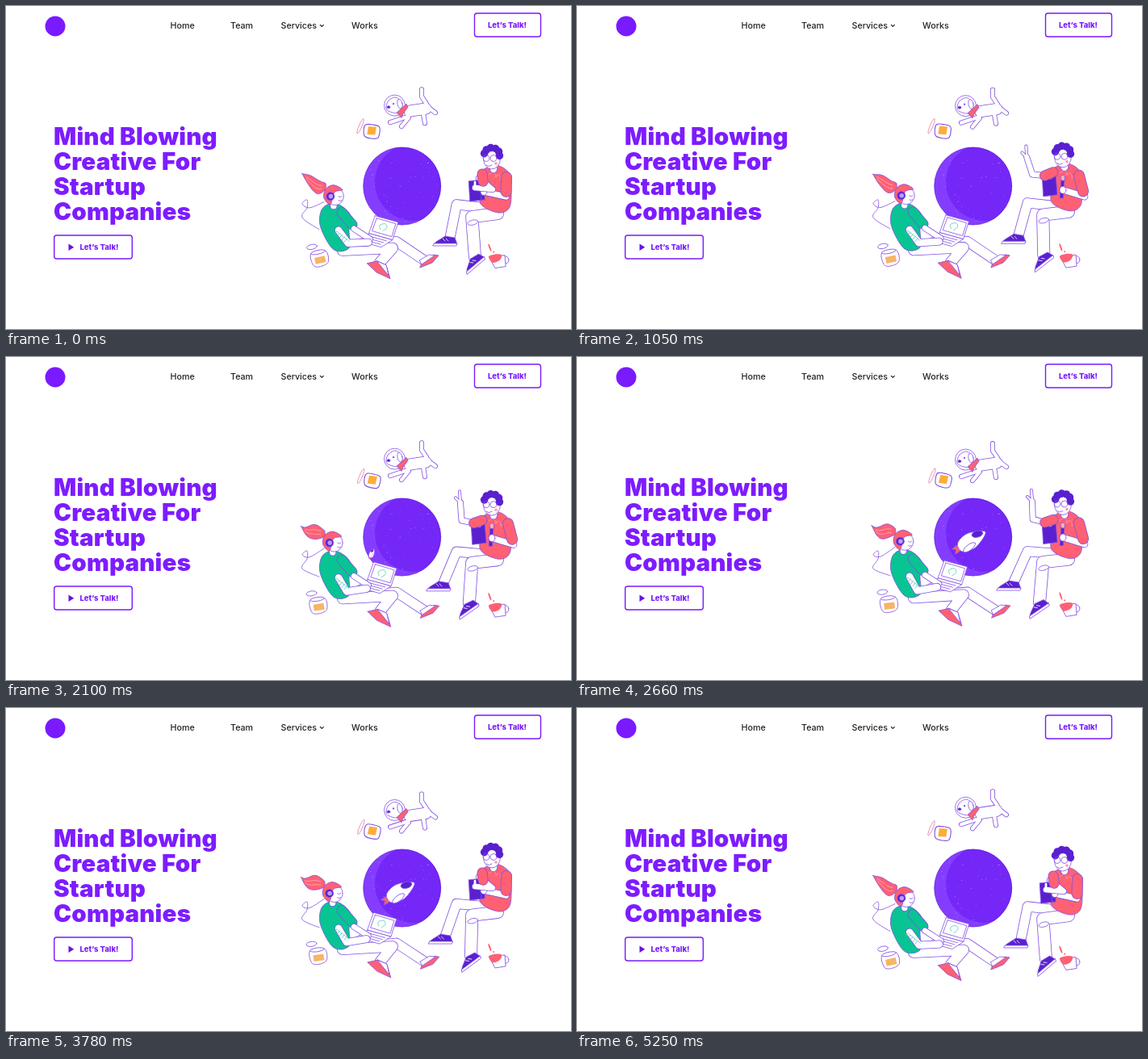
Write an HTML page with a canvas that moves like this. It is 700 by 400 pixels and loops after 5320 ms.

```html
<!DOCTYPE html>
<html lang="en">
<head>
<meta charset="utf-8">
<title>Creative studio</title>
<style>
  html, body { margin: 0; width: 100%; height: 100%; overflow: hidden; background: #fff; }
  svg, canvas { position: absolute; left: 0; top: 0; width: 700px; height: 400px; }
  text { font-family: Inter, "Open Sans", sans-serif; }
  .nav { font-size: 10.7px; font-weight: 500; fill: #222; }
  .btn { font-size: 9.5px; font-weight: 800; fill: #7a1aff; }
  .head { font-size: 29.5px; font-weight: 900; letter-spacing: .2px; fill: #7d1cff; }
</style>
</head>
<body>
<canvas></canvas>
<svg viewBox="0 0 700 400">
  <circle cx="61" cy="25" r="12.5" fill="#7a1aff"/>
  <g class="nav">
    <text x="203.5" y="27.5">Home</text>
    <text x="278" y="27.5">Team</text>
    <text x="340.5" y="27.5">Services</text>
    <text x="428" y="27.5">Works</text>
    <path d="M389 23.2l2.3 2.3 2.3-2.3" fill="none" stroke="#222" stroke-width="1.2"/>
  </g>
  <g fill="none" stroke="#7a1aff" stroke-width="1.4">
    <rect x="580.5" y="9" width="82" height="29" rx="3"/>
    <rect x="59.7" y="284" width="96.6" height="29" rx="3"/>
  </g>
  <path d="M77.5 294.5v8.4l6.7-4.2z" fill="#6a12e0"/>
  <g class="btn">
    <text x="597" y="26.8">Let’s Talk!</text>
    <text x="91.5" y="301.7">Let’s Talk!</text>
  </g>
  <g class="head">
    <text x="59" y="172">Mind Blowing</text>
    <text x="59" y="203">Creative For</text>
    <text x="59" y="234">Startup</text>
    <text x="59" y="265">Companies</text>
  </g>
</svg>
<script>
const LOOP = 5320, STEP = 70;
const LINE = '#8350e2', DARK = '#5a20d0', RED = '#ff6074', GREEN = '#08c493',
  TEAL = '#4fcdb5', GOLD = '#ffac38', WHITE = '#fff';

const canvas = document.querySelector('canvas');
const ctx = canvas.getContext('2d');
const dpr = devicePixelRatio || 1;
canvas.width = 700 * dpr;
canvas.height = 400 * dpr;
ctx.scale(dpr, dpr);
ctx.lineJoin = ctx.lineCap = 'round';

// --- motion ---
const lerp = (a, b, k) => a + (b - a) * k;
const wave = (t, phase) => (1 - Math.cos((t - phase) / LOOP * 2 * Math.PI)) / 2;
function ramp(t, from, to) {
  const k = Math.min(1, Math.max(0, (t - from) / (to - from)));
  return k * k * (3 - 2 * k);
}

// --- drawing helpers ---
function paint(fill, line = LINE, width = .8) {
  if (fill) { ctx.fillStyle = fill; ctx.fill(); }
  if (line) { ctx.strokeStyle = line; ctx.lineWidth = width; ctx.stroke(); }
}
function group(x, y, turn, body) {
  ctx.save();
  ctx.translate(x, y);
  ctx.rotate(turn);
  body();
  ctx.restore();
}
function oval(x, y, rx, ry, fill, line, turn = 0) {
  ctx.beginPath();
  ctx.ellipse(x, y, rx, ry, turn, 0, 2 * Math.PI);
  paint(fill, line);
}
function trace(pts) {
  ctx.beginPath();
  for (const p of pts) ctx.lineTo(...p);
}
function poly(pts, fill, line, width) {
  trace(pts);
  ctx.closePath();
  paint(fill, line, width);
}
function open(pts, line, width) {
  trace(pts);
  paint(null, line, width);
}
// Parallelogram from a corner and two sides.
function quad([x, y], [ux, uy], [vx, vy], fill, line) {
  poly([[x, y], [x + ux, y + uy], [x + ux + vx, y + uy + vy], [x + vx, y + vy]], fill, line);
}
// Smooth line through all points; closed when it has a fill.
function curve(pts, fill, line, width) {
  const n = pts.length, last = fill ? n : n - 1;
  const at = i => fill ? pts[(i + n) % n] : pts[Math.min(n - 1, Math.max(0, i))];
  ctx.beginPath();
  ctx.moveTo(...at(0));
  for (let i = 0; i < last; i++) {
    const [a, b, c, d] = [at(i - 1), at(i), at(i + 1), at(i + 2)];
    ctx.bezierCurveTo(b[0] + (c[0] - a[0]) / 6, b[1] + (c[1] - a[1]) / 6,
      c[0] - (d[0] - b[0]) / 6, c[1] - (d[1] - b[1]) / 6, ...c);
  }
  paint(fill, line, width);
}
// Outlined tubes that melt together; each part is [width, ...points].
function limbs(fill, ...parts) {
  for (const [inset, color] of [[0, LINE], [1.6, fill]]) {
    for (const [w, ...pts] of parts) open(pts, color, w - inset);
  }
}
// Middle joint of a two-bone limb.
function joint([ax, ay], [bx, by], upper, lower, side) {
  const d = Math.min(Math.hypot(bx - ax, by - ay), upper + lower);
  const dx = (bx - ax) / d, dy = (by - ay) / d;
  const along = (upper * upper - lower * lower + d * d) / (2 * d);
  const out = side * Math.sqrt(Math.max(0, upper * upper - along * along));
  return [ax + dx * along + dy * out, ay + dy * along - dx * out];
}
const bent = (w, a, b, upper, lower, side) => [w, a, joint(a, b, upper, lower, side), b];

let seed = 7;
const rand = () => (seed = seed * 16807 % 2147483647) / 2147483647;
const stars = Array.from({ length: 60 }, () => {
  const angle = rand() * 2 * Math.PI, far = 46 * Math.sqrt(rand());
  return [490.7 + far * Math.cos(angle), 223 + far * Math.sin(angle), .25 + rand() * .35];
});

// --- scene parts ---
function planet() {
  ctx.save();
  ctx.beginPath();
  ctx.arc(490.7, 223, 48, 0, 2 * Math.PI);
  ctx.clip();
  oval(490.7, 223, 48, 48, '#843dff', null);
  oval(505, 218, 48, 48, '#7427f7', null);
  for (const [x, y, r] of stars) oval(x, y, r, r, '#b084ff', null);
  ctx.restore();
  oval(490.7, 223, 48, 48, null, '#6420dc');
}

function rocket(t) {
  const p = ramp(t, 1820, 2600), q = ramp(t, 4450, 4980), size = p * (1 - q);
  if (size < .02) return;
  const x = 450 + 39 * p * p + 33 * q, y = 258 - 31 * p ** .6 - 33 * q;
  group(x, y, -1.4 + .85 * p - .15 * q, () => {
    ctx.scale(size, size);
    poly([[-17, -4], [-27, -4], [-23, 0], [-27, 4], [-17, 4]], RED);
    curve([[-17, -6], [0, -10], [20, 0], [0, 10], [-17, 6]], WHITE);
    oval(10, -3, 7, 4, DARK, LINE, .3);
    oval(-7, 6, 9, 3.5, WHITE, LINE, -.1);
  });
}

function dog(a) {
  group(0, 4.3 * a, 0, () => {
    limbs(WHITE,
      [15, [500, 130], [520, 127]],
      [6, [521, 121], [515, 112], [515, 103]],
      [6, [524, 126], [532, 132]], [6, [517, 133], [519, 145]],
      [6, [497, 137], [476, 144]], [6, [499, 138], [490, 149]]);
    oval(481.5, 123, 13, 13, WHITE);
    curve([[474, 117], [483, 113], [491, 121], [486, 132], [474, 130], [471, 125]], WHITE);
    oval(488, 121, 3, 6, WHITE, LINE, -.2);
    oval(474, 125, 2, 1.5, DARK);
    oval(480, 121, .7, .9, DARK);
    poly([[484, 132], [496, 121], [498, 125], [492, 133], [490, 138]], RED);
  });
}

function floaters(a) {
  group(453 + a, 155 - 3 * a, .15 + .1 * a, () => {
    curve([[-8, -7], [0, -8], [8, -7], [10, -1], [8, 8], [-7, 8], [-10, -2]], WHITE, LINE, 1.1);
    quad([-5, -5], [10, -1], [0, 10], GOLD, null);
  });
  group(439 + a, 149 - 2 * a, .4, () => oval(0, 0, 1.8, 10, WHITE, '#e08cae'));
  // jar
  group(388 - 2 * a, 311 - 7 * a, .1 * a - .22, () => {
    oval(-6, -14, 6.5, 3, WHITE);
    curve([[-9, -6], [9, -6], [10, 8], [0, 12], [-9, 9]], WHITE);
    quad([-6, 0], [13, 0], [0, 8], '#f6b567', null);
    oval(0, -6, 9, 2.4, WHITE);
  });
  // mug
  group(610, 316 - 3.5 * a, -.15, () => {
    oval(9, 0, 4, 4.5, WHITE);
    poly([[-11, -7], [9, -6], [8, 8], [-5, 8]], WHITE);
    curve([[-11, -7], [-3, -9], [5, -7], [2, -1], [-7, 1]], RED, null);
    oval(-8, -18, 1, 5, RED, null, -.2);
    oval(-4, -12, 1, 1, RED, null);
  });
}

function ponytail(a) {
  const side = sign => Array.from({ length: 7 }, (_, i) => {
    const s = i / 6;
    const mid = 223 - 15 * s ** 3 + 8 * a * s + 2 * Math.sin(s * 6 + 3 * a);
    return [396 - 29 * s, mid + sign * 9 * Math.sin(Math.PI * (.12 + .88 * s))];
  });
  curve([...side(-1), ...side(1).reverse()], RED);
  for (const k of [-.3, .3]) curve(side(k).slice(1, 6), null, '#ffb3bd');
}

function woman(a) {
  const hip = [424, 301 - 5 * a], seat = [417, 303 - 5 * a];
  const farFoot = [518 + a, 315 - a], nearFoot = [463 + a, 318 - 5 * a];
  const lift = 6.5 * a;
  const hand = [449 - 3 * a, 293 - 8.5 * a];

  curve([[394, 243 - 8 * a], [376, 250 - 3 * a], [367, 245], [373, 240], [373, 250],
    [367, 262], [388, 277 - lift]]);
  limbs(WHITE, bent(13, hip, farFoot, 60, 42, 1));
  group(...farFoot, 0, () => {
    poly([[-3, 2], [12, -7], [18, -6], [10, 3], [-5, 9]], RED);
    poly([[-6, 0], [6, -7], [13, -6], [-3, 5]], WHITE);
  });
  limbs(WHITE, bent(14, seat, nearFoot, 62, 24, 1));
  group(...nearFoot, 0, () => {
    poly([[-16, 1], [-3, -2], [8, 3], [13, 20], [-4, 12]], RED);
    poly([[-4, -2], [8, 3], [11, 16]], WHITE);
  });

  group(0, -lift, 0, () => {
    curve([[399, 246], [414, 247], [427, 260], [425, 278], [425, 300], [406, 302], [390, 275], [390, 255]], GREEN);
    limbs(GREEN, [13, [416, 256], [429, 271]]);
  });
  // laptop
  group(-2.5 * a, -8.5 * a, 0, () => {
    quad([457, 260], [29, 8], [-7, 22], WHITE);
    quad([459, 263], [24, 7], [-5, 16], WHITE);
    curve([[464, 277], [463, 272], [470, 270], [472, 275], [467, 279]], null, TEAL);
    quad([450, 282], [29, 8], [-14, 9], WHITE);
    for (let i = 1; i < 4; i++) open([[451 - 3.5 * i, 282.5 + 2.2 * i], [475 - 3.5 * i, 289 + 2.2 * i]]);
  });
  const shoulder = [412, 278 - lift];
  limbs(WHITE, [8, [431, 276 - lift], [hand[0] + 2, hand[1] - 4]]);
  limbs(WHITE, bent(10, shoulder, hand, 20, 25, -1));
  for (let i = 0; i < 5; i++) {
    const x = 409 + 3 * i, y = 279 + 2.4 * i - lift;
    open([[x - 2, y + 4], [x + 1, y], [x + 4, y + 3]], TEAL);
  }

  group(-1.7 * a, -8 * a, 0, () => {
    ponytail(a);
    limbs(WHITE, [9, [406, 241], [406, 248]]);
    oval(408, 236, 10.5, 11, WHITE);
    curve([[394, 238], [396, 227], [406, 222], [417, 228], [407, 231], [402, 246]], RED);
    open([[412, 236], [414, 237], [416, 236]]);
    open([[412, 241], [414, 242], [416, 241]]);
    oval(402, 236, 5, 5, DARK);
    oval(402.5, 236, 2.8, 2.8, '#b79cff', null);
  });
}

function shoe([x, y], turn) {
  group(x, y, turn, () => {
    poly([[-6, -2], [6, 0], [9, 8], [-20, 8], [-17, 5]], DARK);
    quad([-20, 7], [29, 0], [-1, 3], WHITE);
    for (const dx of [-9, -5]) open([[dx, 1], [dx + 3, 4]], WHITE);
  });
}

function manHead() {
  limbs(WHITE, [10, [604, 194], [604, 202]]);
  oval(602, 189, 10.5, 13, WHITE);
  for (let i = 0; i < 6; i++) {
    const angle = Math.PI * (1.05 + i * .2);
    oval(602 + 9.5 * Math.cos(angle), 184 + 8.5 * Math.sin(angle), 4.8, 4.8, DARK, null);
  }
  for (const x of [595, 604]) oval(x, 188.5, 4, 4, null);
  open([[595, 197], [598, 198.5], [602, 197]]);
  oval(607, 195, 1.8, 1.8, '#ff9aa8', null);
}

function man(t, b) {
  const raise = ramp(t, 450, 1000) - ramp(t, 3000, 3500);
  const rise = 6.5 * b;
  const farFoot = [550 - 9 * b, 287 - 8 * b], nearFoot = [581 - 8 * b, 311 - 7 * b];

  limbs(WHITE, bent(13, [594, 250 - rise], farFoot, 36, 42, -1));
  shoe(farFoot, 0);
  const leg = bent(16, [609, 257 - rise], nearFoot, 32, 50, -1);
  limbs(WHITE, leg);
  oval(leg[2][0] + 1, leg[2][1] + 7, 6.5, 3, WHITE, LINE, -.25);
  shoe(nearFoot, -.7 + .1 * b);

  group(0, -rise, 0, () => {
    curve([[596, 200], [611, 198], [624, 208], [626, 224], [624, 249], [610, 256], [588, 245], [589, 222], [584, 210]], RED);
    for (let i = 0; i < 3; i++) curve([[598 + 7 * i, 209 + 3 * i], [604 + 7 * i, 206 + 3 * i], [608 + 6 * i, 212 + 4 * i]], null, '#ff9ba8');
    manHead();

    // arm with the microphone
    const grip = [lerp(592, 602, raise), 230];
    const shoulder = [620 + 2 * raise, 212];
    const [, , elbow] = bent(0, shoulder, grip, 24 + 3 * raise, 28, 1);
    quad([573 + 3 * raise, 217 - 4 * raise], [17, -2], [2, 25], DARK);
    limbs(WHITE, [9, elbow, grip]);
    limbs(RED, [14, shoulder, [lerp(shoulder[0], elbow[0], .75), lerp(shoulder[1], elbow[1], .75)]]);
    group(grip[0] - 1, grip[1], .06 * raise, () => {
      quad([-2, -14], [4, 0], [0, 24], DARK);
      oval(0, -15, 2.8, 3.5, '#ffb0b4');
      oval(1, 0, 4, 4.5, WHITE);
    });

    // waving arm
    const tip = [lerp(581, 553 + 10 * b, raise), lerp(218, 178 - 6.5 * b, raise)];
    const wrist = [tip[0] + raise, tip[1] + lerp(7, 14, raise)];
    const arm = bent(8, [586, 213], wrist, 22, 22, 1);
    const spread = 6 * raise;
    limbs(WHITE, arm, [4, wrist, tip], [4, wrist, [wrist[0] - spread, wrist[1] - spread]]);
    limbs(RED, [13, [590, 208], [lerp(586, arm[2][0], .3), lerp(213, arm[2][1], .3)]]);
  });
}

function draw(t) {
  const a = wave(t, 350), b = wave(t, 0);
  ctx.clearRect(0, 0, 700, 400);
  planet();
  rocket(t);
  dog(a);
  floaters(a);
  woman(a);
  man(t, b);
}

const start = performance.now();
function tick() {
  const t = (performance.now() - start) % LOOP;
  draw(Math.floor(t / STEP) * STEP);
  requestAnimationFrame(tick);
}
tick();
</script>
</body>
</html>
```
